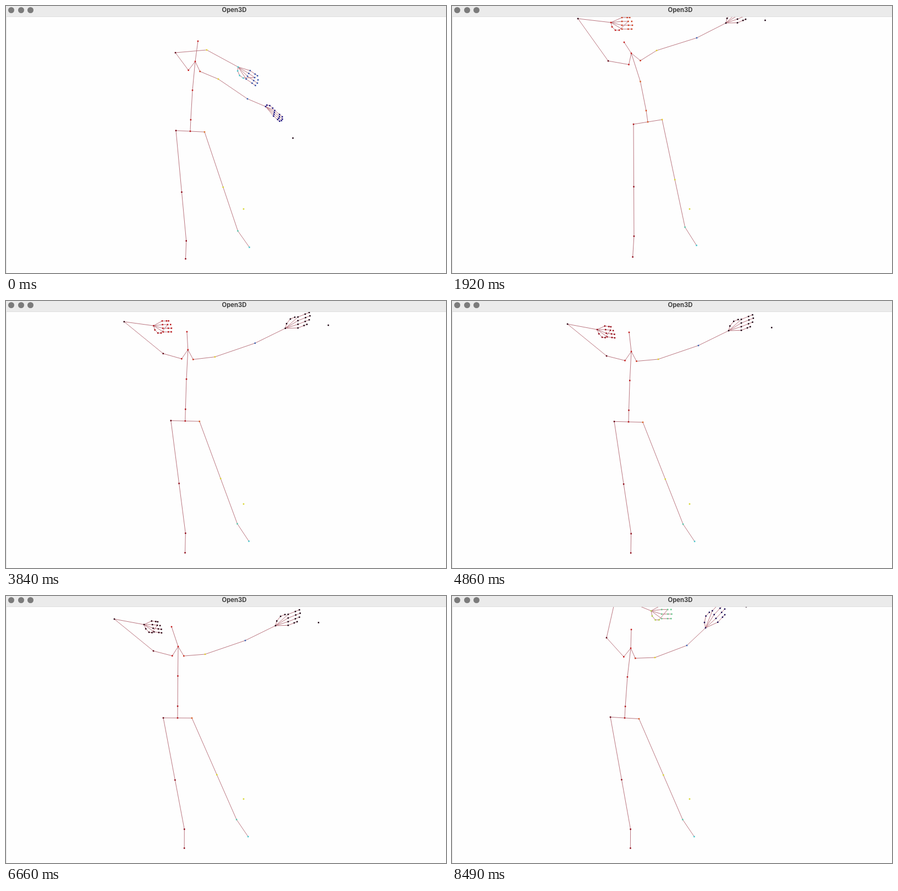
Write an HTML page with a canvas that moves like this. It is 800x486 px and loops after 8520 ms.

```html
<!DOCTYPE html>
<html lang="en">
<head>
<meta charset="utf-8">
<title>Open3D</title>
<style>
  html, body { margin: 0; width: 100%; height: 100%; overflow: hidden; background: #fefefe; }
  canvas { position: absolute; left: 0; top: 0; }
  .edge { position: absolute; left: 0; top: 20px; width: 1px; bottom: 0; background: #e4e4e4; }
  .bar {
    position: absolute; left: 0; top: 0; width: 800px; height: 20px; box-sizing: border-box;
    background: #ebebeb; border-bottom: 1px solid #dedede;
  }
  .bar i { position: absolute; top: 1.5px; width: 11px; height: 11px; border-radius: 50%; background: #7b7b7b; }
  .bar b {
    position: absolute; left: 365px; width: 100px; top: 0; text-align: center;
    font: 700 11.3px/14px Inter, sans-serif; color: #3f3f3f;
  }
</style>
</head>
<body>
<canvas id="view" width="800" height="486"></canvas>
<div class="edge"></div>
<div class="bar">
  <i style="left:4px"></i><i style="left:21.5px"></i><i style="left:39px"></i>
  <b>Open3D</b>
</div>
<script>
const ctx = document.getElementById('view').getContext('2d');
const LOOP = 8520, STEP = 30;

const add = (a, b) => [a[0] + b[0], a[1] + b[1]];
const sub = (a, b) => [a[0] - b[0], a[1] - b[1]];
const mix = (a, b, p) => a + (b - a) * p;
const blend = (a, b, p) => a.map((v, k) => mix(v, b[k], p));
const clamp = (v, lo, hi) => Math.min(hi, Math.max(lo, v));

// Arms list elbow, wrist and hand. Palms hold the finger axis and the spread axis.
const raised = { palmA: [1, 0, 0, 1], palmB: [1.05, -.45, 0, -.95], depthA: 2, depthB: 9 };

const bow = {
  pelvis: [335, 228], neck: [344, 101], head: [349, 64],
  armA: [[308, 85], [365, 80], [422, 111]],
  armB: [[386, 133], [439, 169], [472, 183]],
  palmA: [.94, .66, -.34, .73], palmB: [.77, .65, .1, -.49], depthA: 6, depthB: 8
};
const reach = {
  ...raised, pelvis: [352, 213], neck: [348, 87], head: [343, 56],
  armA: [[304, 73], [316, -8], [370, -30]],
  armB: [[390, 88], [450, 38], [493, -10]]
};
const lean = {
  ...raised, pelvis: [356, 211], neck: [326, 86], head: [313, 66],
  armA: [[284, 100], [229, 23], [289, 30]],
  armB: [[372, 81], [445, 58], [498, 31]]
};
const open = {
  ...raised, pelvis: [330, 217], neck: [335, 86], head: [335, 55],
  armA: [[290, 92], [219, 34], [272, 39]],
  armB: [[384, 98], [457, 73], [512, 46]],
  palmA: [.86, -.1, 0, .96], palmB: [1.15, -.46, 0, -.95]
};
const rise = {
  pelvis: [314, 222], neck: [325, 95], head: [326, 61],
  armA: [[281, 76], [298, 1], [362, 27]],
  armB: [[369, 112], [427, 90], [461, 58]],
  palmA: [.96, 0, 0, 1.18], palmB: [.9, -.96, -.47, -.99], depthA: 4.5, depthB: 8.4
};

// The open pose drifts left and sinks while the pelvis and head tilt
function drift(by, pelvis, head, depthA) {
  const move = q => add(q, by);
  return {
    ...open, pelvis, head, depthA, neck: add(open.neck, [by[0], by[1] - 2]),
    armA: open.armA.map((q, k) => add(move(q), k === 2 ? [1, 5] : [0, 0])), armB: open.armB.map(move),
    palmA: [.78, .1, .2, .94]
  };
}
const sink = drift([-9, 8], [321, 220], [322, 57], 1);
const settle = drift([-22, 8], [312, 222], [301, 56], 0);

const keys = [
  [0, bow], [1110, reach], [1920, lean], [2910, open],
  [4860, sink], [6660, settle], [7800, settle], [8490, rise]
];

// Depth colours, from near red to far navy
const palette = [
  [42, 0, 16], [142, 10, 24], [196, 26, 26], [224, 116, 40], [226, 216, 44],
  [124, 200, 96], [72, 198, 204], [58, 98, 180], [28, 20, 128], [28, 4, 18]
];

function color(depth) {
  const v = clamp(depth, 0, palette.length - 1);
  const i = Math.min(Math.floor(v), palette.length - 2);
  return `rgb(${blend(palette[i], palette[i + 1], v - i).map(Math.round)})`;
}

let dots;
const dot = (q, depth) => dots.push([q, color(depth)]);

function line(...points) {
  ctx.beginPath();
  points.forEach(([x, y]) => ctx.lineTo(x, y));
  ctx.stroke();
}

// Draws joined points and marks all but the first
function chain(points, depths) {
  line(...points);
  points.slice(1).forEach((q, k) => dot(q, depths[k]));
}

function shoulders({ pelvis, neck }) {
  const tilt = neck[0] - pelvis[0];
  const center = add(neck, [-.2 * tilt, 17]), half = [10.5, .12 * tilt];
  return { A: sub(center, half), B: add(center, half) };
}

// Bones turn and stretch rather than sliding straight
function swing(a, b, p) {
  const start = Math.atan2(a[1], a[0]);
  let turn = Math.atan2(b[1], b[0]) - start;
  turn -= Math.round(turn / (2 * Math.PI)) * 2 * Math.PI;
  const len = mix(Math.hypot(...a), Math.hypot(...b), p);
  return [len * Math.cos(start + turn * p), len * Math.sin(start + turn * p)];
}

function arm(side, from, to, p, shoulder) {
  const a = [shoulders(from)[side], ...from['arm' + side]];
  const b = [shoulders(to)[side], ...to['arm' + side]];
  const out = [shoulder];
  for (let k = 1; k < a.length; k++) {
    out.push(add(out[k - 1], swing(sub(a[k], a[k - 1]), sub(b[k], b[k - 1]), p)));
  }
  return out;
}

function hand(root, palm, depth, fingerDepth, crossed) {
  const [ax, ay, bx, by] = palm;
  const place = (u, v) => add(root, [u * ax + v * bx, u * ay + v * by]);
  const fingers = [0, 1, 2, 3].map(i => [20, 32, 39].map((reach, k) =>
    place(reach - .6 * k * (i - 2) ** 2, 7 * i - 9)));
  const thumb = [place(2, 8), place(8, 14), place(15, 14)];

  fingers.forEach((f, i) => line(root, ...f.slice(0, crossed && i === 1 ? 2 : 3)));
  line(root, ...thumb, ...(crossed ? [fingers[1][1]] : []));
  fingers.flat().forEach(q => dot(q, fingerDepth));
  thumb.forEach(q => dot(q, depth));
  return place;
}

// The feet stay planted and follow the pelvis only slightly
function leg(pelvis, hip, ankle, toe, sway, give, depths) {
  const [dx, dy] = sub(pelvis, [330, 217]);
  const foot = add(ankle, [dx * sway, dy * give]);
  const tip = add(toe, [dx * .1, dy * .2]);
  chain([pelvis, hip, blend(hip, foot, .558), foot, tip], depths);
}

function phase(t) {
  const i = Math.max(0, keys.findIndex(k => k[0] > t) - 1);
  const last = t >= keys[keys.length - 1][0];
  const [[t0, from], [t1, to]] = last ? keys.slice(-2) : keys.slice(i, i + 2);
  const p = clamp((t - t0) / (t1 - t0), 0, 1);
  return { from, to, p: p * p * (3 - 2 * p) };
}

function draw(t) {
  const { from, to, p } = phase(t);
  const at = name => blend(from[name], to[name], p);
  const depthA = mix(from.depthA, to.depthA, p), depthB = mix(from.depthB, to.depthB, p);
  const pelvis = at('pelvis'), neck = at('neck'), head = at('head');
  const trunk = sub(neck, pelvis);
  const along = (fx, fy) => add(pelvis, [trunk[0] * fx, trunk[1] * fy]);
  const twist = clamp((pelvis[0] - 330) / 25, 0, 1);

  dots = [];
  ctx.clearRect(0, 0, 800, 486);
  ctx.strokeStyle = '#b9757f';
  ctx.lineWidth = 1;

  dot(pelvis, 1.7 + twist);
  chain([pelvis, along(.1, .165), along(.45, .588), neck, head], [1.6 + twist, 1.8 + twist, 2, 2]);

  const half = [26, trunk[0] * .14];
  leg(pelvis, sub(pelvis, half), [327, 422], [326, 458], .15, .5, [.6 + twist, 1, 1, 1]);
  leg(pelvis, add(pelvis, half), [421, 405], [442, 437], .1, .4, [2.8 + twist, 4.1, 5.7, 6]);

  const shoulder = shoulders({ pelvis, neck });
  const armA = arm('A', from, to, p, shoulder.A);
  const armB = arm('B', from, to, p, shoulder.B);
  chain([neck, ...armA], [2, .5, depthA - 2, depthA]);
  chain([neck, ...armB], [2.3, 3.9, 7, depthB]);
  hand(armA[3], at('palmA'), depthA, depthA * 1.2, true);
  const place = hand(armB[3], at('palmB'), depthB, depthB, false);
  dot(place(68, -27), 9);
  dot([432, 369.5], 4.1);

  for (const [[x, y], fill] of dots) {
    ctx.fillStyle = fill;
    ctx.fillRect(x - 1.25, y - 1.25, 2.5, 2.5);
  }
}

const begin = performance.now();
function tick() {
  const t = (performance.now() - begin) % LOOP;
  draw(Math.floor(t / STEP) * STEP);
  requestAnimationFrame(tick);
}
tick();
</script>
</body>
</html>
```
